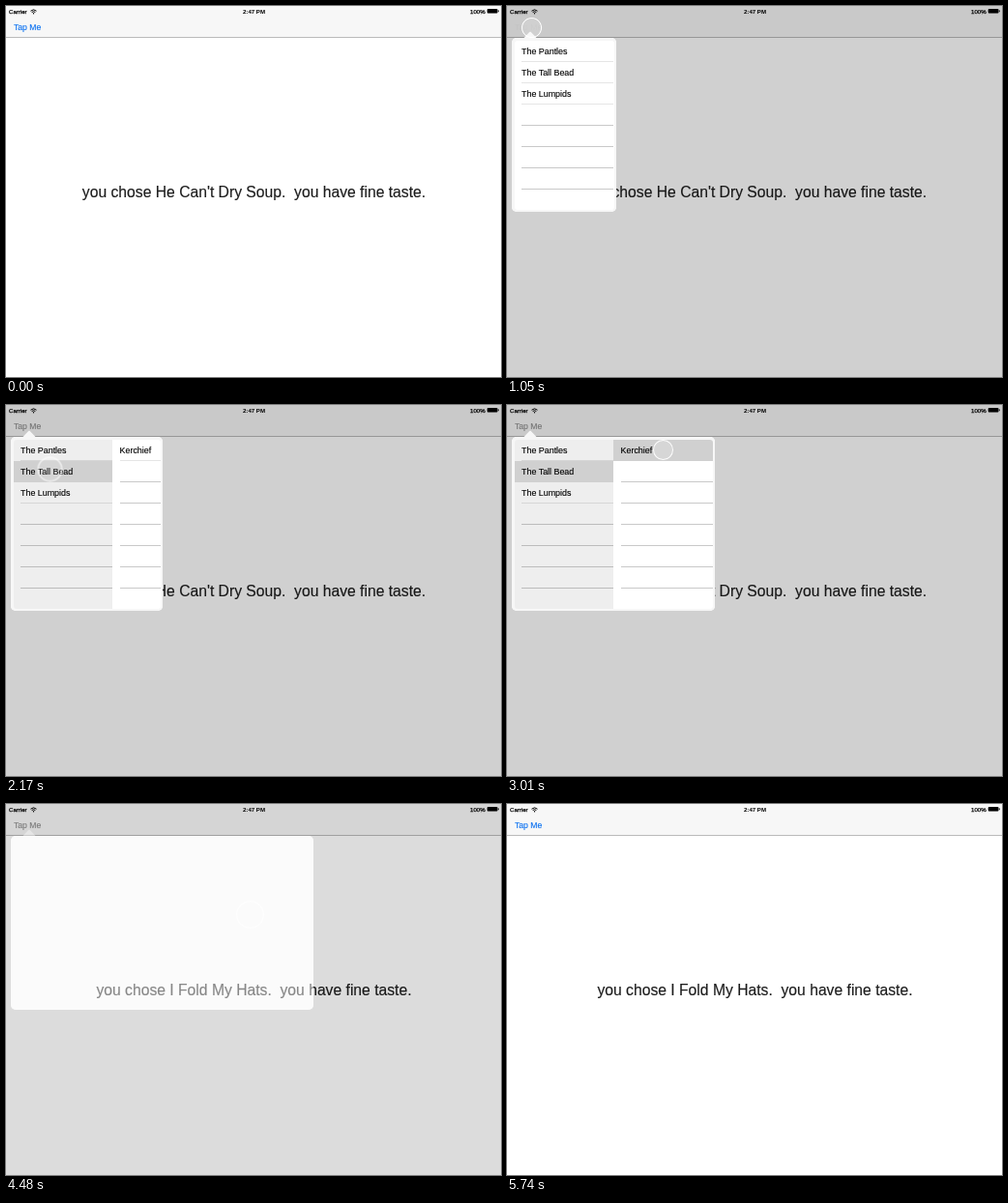
Write an HTML page that moves like this. It is 512x384 px and loops after 5.81 s.

```html
<!DOCTYPE html>
<html lang="en">
<head>
<meta charset="utf-8">
<title>Popover picker</title>
<style>
  :root { --loop: 5810ms; }
  html, body { margin: 0; width: 100%; height: 100%; overflow: hidden; background: #fff; }
  body { position: relative; font-family: "Liberation Sans", Arial, sans-serif; color: #000; }
  div, span, svg { position: absolute; box-sizing: border-box; white-space: pre; }

  .bar { left: 0; top: 0; width: 100%; height: 33px; background: #f7f7f7; border-bottom: 1px solid #bababa; }
  .status { top: -.5px; height: 11px; line-height: 11px; font-size: 6.1px; -webkit-text-stroke: .25px; }
  .strong { font-weight: bold; -webkit-text-stroke: 0; }
  .button { left: 8px; top: 14.6px; line-height: 15px; font-size: 8.6px; color: #0a70f0; -webkit-text-stroke: .15px;
    animation: button var(--loop) linear infinite; }

  .label { left: 0; top: 180.5px; width: 513px; line-height: 24px; text-align: center;
    font-size: 15.7px; color: #1c1c1c; -webkit-text-stroke: .15px; }
  .before { animation: before var(--loop) step-end infinite; }
  .after { animation: after var(--loop) step-end infinite; }

  .dim, .pop { left: 5px; top: 33px; width: 108px; height: 180px; border-radius: 5px; opacity: 0; }
  .dim { box-shadow: 0 0 0 640px rgba(0, 0, 0, .185);
    animation: grow var(--loop) infinite, dim var(--loop) infinite; }
  .pop { background: #f7f7f7;
    animation: grow var(--loop) infinite, pop var(--loop) infinite; }
  .arrow { left: 12px; top: -6.6px; width: 14px; height: 7px; background: #f7f7f7;
    clip-path: polygon(0 100%, 46% 4%, 54% 4%, 100% 100%); }
  .view { left: 2.5px; right: 2px; top: 3px; bottom: 2px; overflow: hidden; border-radius: 3px;
    animation: view var(--loop) linear infinite; }
  .col { top: 0; width: 102.5px; height: 176px; background: #fff; }
  .row { left: 0; width: 100%; height: 22px; line-height: 22px; padding-left: 7.6px;
    font-size: 8.9px; -webkit-text-stroke: .12px; }
  .line { left: 7.6px; right: 0; height: 1px; background: rgba(0, 0, 0, .21); }
  .line.soft { background: rgba(0, 0, 0, .1); }

  /* these start at --at and stay on until the popover has gone */
  .stale { animation: stale var(--loop) linear calc(var(--at) - 5811ms) infinite; }
  .picked { animation: picked var(--loop) step-end calc(var(--at) - 5811ms) infinite; }
  .touch { width: 21px; height: 21px; margin: -10.5px 0 0 -10.5px; border-radius: 50%;
    border: 1.6px solid rgba(255, 255, 255, .95); background: rgba(255, 255, 255, .15); opacity: 0;
    animation: touch var(--loop) ease-in calc(var(--at) - 5811ms) infinite; }

  @keyframes button {
    0%, 15.65% { color: #0a70f0; opacity: 1; }
    15.66%, 18.06% { color: #0a70f0; opacity: .18; }
    18.07%, 19.27% { color: #8e8e8e; opacity: .06; }
    22.89%, 77.11% { color: #8e8e8e; opacity: 1; }
    81.93%, 100% { color: #0a70f0; opacity: 1; }
  }
  @keyframes before { 0% { opacity: 1; } 74.69%, 100% { opacity: 0; } }
  @keyframes after { 0% { opacity: 0; } 74.69%, 100% { opacity: 1; } }
  @keyframes grow {
    0%, 33.73% { width: 108px; animation-timing-function: ease-in-out; }
    41.2%, 51.81% { width: 210px; animation-timing-function: ease-in-out; }
    59.28%, 100% { width: 313px; }
  }
  @keyframes dim {
    0%, 18.06% { opacity: 0; }
    18.07%, 74.69% { opacity: 1; animation-timing-function: ease-in-out; }
    81.93%, 100% { opacity: 0; }
  }
  @keyframes pop {
    0%, 18.06% { opacity: 0; }
    18.07%, 74.69% { opacity: 1; animation-timing-function: ease-in-out; }
    79.52%, 100% { opacity: 0; }
  }
  @keyframes view { 0%, 74.69% { opacity: 1; } 76.6%, 100% { opacity: 0; } }
  @keyframes stale {
    0% { background: #fff; }
    2.4%, 44% { background: #eee; }
    44.1%, 100% { background: #fff; }
  }
  @keyframes picked { 0% { background: #d0d0d0; } 44%, 100% { background: transparent; } }
  @keyframes touch {
    0% { opacity: 1; transform: scale(1); }
    9.64%, 100% { opacity: 0; transform: scale(2.2); }
  }
</style>
</head>
<body>
  <div class="bar"></div>
  <span class="status" style="left:3px">Carrier</span>
  <svg style="left:25px;top:2.5px" width="7" height="6" viewBox="0 0 7 6" fill="none" stroke="#000" stroke-width="1">
    <path d="M.5 2.2Q3.5-.6 6.5 2.2M1.7 3.5Q3.5 1.9 5.3 3.5"/>
    <circle cx="3.5" cy="4.7" r=".7" fill="#000" stroke="none"/>
  </svg>
  <span class="status strong" style="left:0;width:513px;text-align:center">2:47 PM</span>
  <span class="status" style="left:480px">100%</span>
  <svg style="left:497px;top:2px" width="13" height="7" viewBox="0 0 13 7">
    <rect x=".7" y="1.1" width="10.8" height="4.4" rx="1"/>
    <rect x="11.9" y="2.4" width=".8" height="1.8"/>
  </svg>
  <span class="button">Tap Me</span>

  <div class="label before">you chose He Can't Dry Soup.  you have fine taste.</div>
  <div class="label after">you chose I Fold My Hats.  you have fine taste.</div>

  <div class="dim"></div>
  <div class="pop">
    <div class="arrow"></div>
    <div class="view"></div>
  </div>

<script>
  const ROWS = 8, ROW_H = 22, COL_W = 102.5;

  // pick: chosen row, at: moment it is tapped (ms), x/y: tap position
  const columns = [
    { items: ["The Pantles", "The Tall Bead", "The Lumpids"], pick: 1, at: 1960, x: 45, y: 66.5 },
    { items: ["Kerchief"], pick: 0, at: 3010, x: 161, y: 46 },
    { items: ["Postman And The…", "Sunny Kerchief (In…", "Kerchief.", "I Fold My Hats",
              "Evening Haystack", "Button Me Button", "Tilting In My Sofa", "Up With The Mops"],
      pick: 3, at: 4200, x: 252, y: 114 }
  ];

  function add(parent, cls, style, text = "") {
    const el = document.createElement("div");
    el.className = cls;
    el.style.cssText = style;
    el.textContent = text;
    parent.append(el);
    return el;
  }

  const view = document.querySelector(".view");
  columns.forEach(({ items, pick, at }, c) => {
    const last = c === columns.length - 1;
    const col = add(view, last ? "col" : "col stale", `left:${c * COL_W}px;--at:${at}ms`);
    for (let r = 0; r < ROWS; r++) {
      const soft = r < items.length ? " soft" : "";
      add(col, "line" + soft, `top:${(r + 1) * ROW_H - 1}px`);
    }
    items.forEach((text, r) =>
      add(col, r === pick ? "row picked" : "row", `top:${r * ROW_H}px`, text));
  });

  [{ at: 1050, x: 25, y: 22 }, ...columns].forEach(({ at, x, y }) =>
    add(document.body, "touch", `left:${x}px;top:${y}px;--at:${at}ms`));
</script>
</body>
</html>
```
